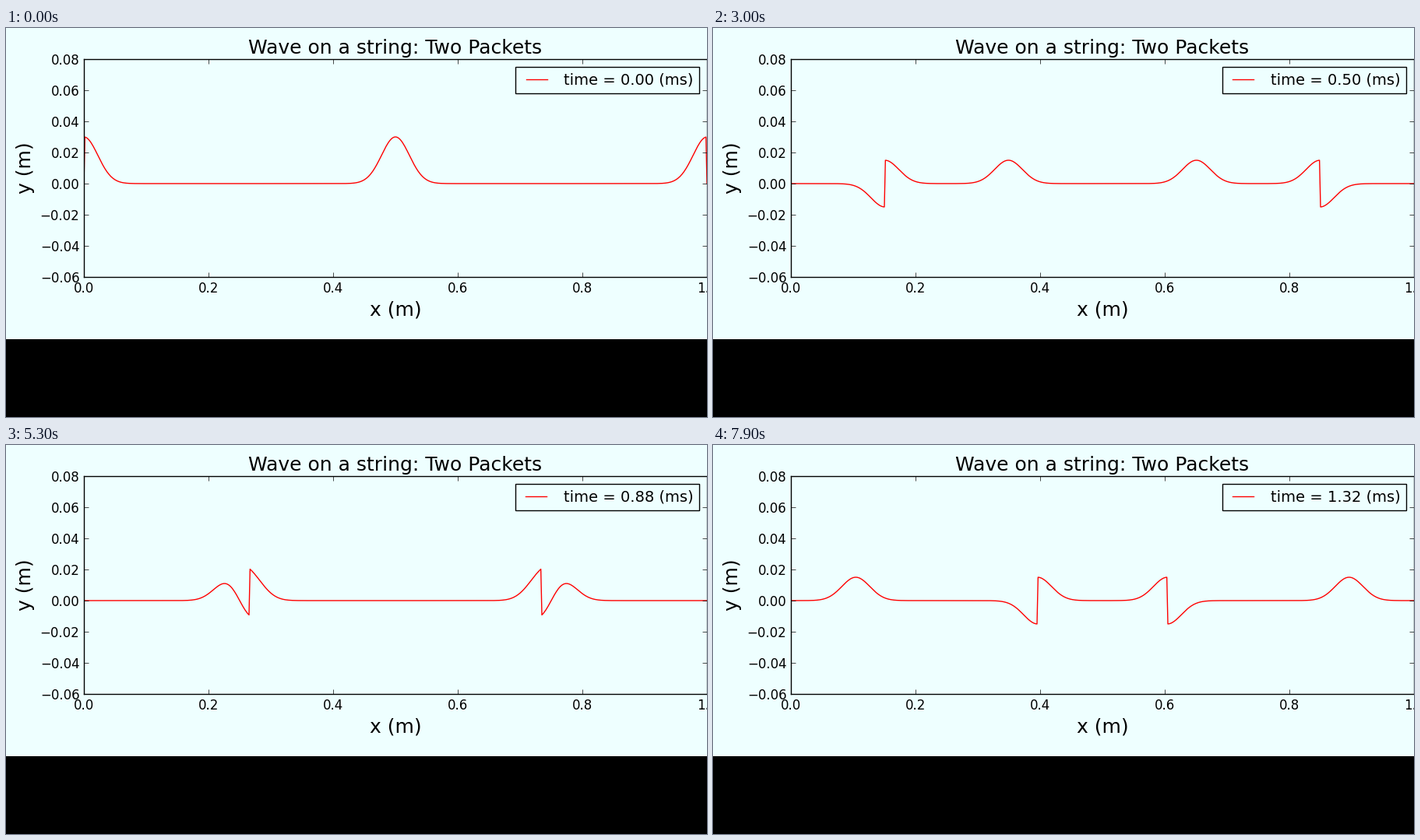
Recreate the animation shown at these times as a matplotlib script. Size 900 by 500 pixels, loop 8000 ms.

```python
import matplotlib.pyplot as plt
import numpy as np
from matplotlib.animation import FuncAnimation
from matplotlib.patches import Rectangle

FRAMES = 80
STEPS = 3          # time steps per frame
N = 600            # string segments
BG = "#eeffff"

plt.rcParams.update({
    "font.family": "DejaVu Sans",
    "font.size": 12,
    "axes.linewidth": 1.0,
    "axes.axisbelow": False,
    "patch.linewidth": 1.0,
    "lines.solid_joinstyle": "round",
})


def packets(x):
    """Gaussian packets at both ends and in the middle, ends held at zero."""
    y = sum(0.03 * np.exp(-1000 * (x - c) ** 2) for c in (0, 0.5, 1))
    y[0] = y[-1] = 0
    return y


def solve(y0, steps):
    """Leapfrog solution of the wave equation with Courant number 1."""
    u = [y0, y0.copy()]
    for _ in range(steps):
        y = np.zeros_like(y0)
        y[1:-1] = u[-1][2:] + u[-1][:-2] - u[-2][1:-1]
        u.append(y)
    return u


def label(n):
    return f"time = {n / 60:.2f} (ms)"


x = np.linspace(0, 1, N + 1)
wave = solve(packets(x), STEPS * FRAMES)

fig = plt.figure(figsize=(9, 5), dpi=100, facecolor=BG)
fig.add_artist(Rectangle((0, 0), 1, 0.2, transform=fig.transFigure,
                         facecolor="black", linewidth=0))

ax = fig.add_axes([100 / 900, 180 / 500, 800 / 900, 280 / 500], facecolor=BG)
ax.set_xlim(0, 1)
ax.set_ylim(-0.06, 0.08)
ax.set_xticks(np.arange(6) / 5)
ax.set_yticks(np.arange(-3, 5) / 50)
ax.tick_params(direction="in", top=True, right=True, length=4, width=0.5, pad=4)
ax.set_title("Wave on a string: Two Packets", fontsize=18, pad=5)
ax.set_xlabel("x (m)", fontsize=18, labelpad=5)
ax.set_ylabel("y (m)", fontsize=18, labelpad=5)

line, = ax.plot(x, wave[1], color="red", linewidth=1, label=label(0))
legend = ax.legend(loc="upper right", fontsize=14, numpoints=2, fancybox=False,
                   framealpha=1, facecolor=BG, edgecolor="black")
clock = legend.get_texts()[0]


def update(n):
    line.set_ydata(wave[STEPS * n + 1])
    clock.set_text(label(n))
    return line, clock


anim = FuncAnimation(fig, update, frames=FRAMES, interval=100, repeat=True,
                     repeat_delay=0, blit=False)
plt.show()
```
